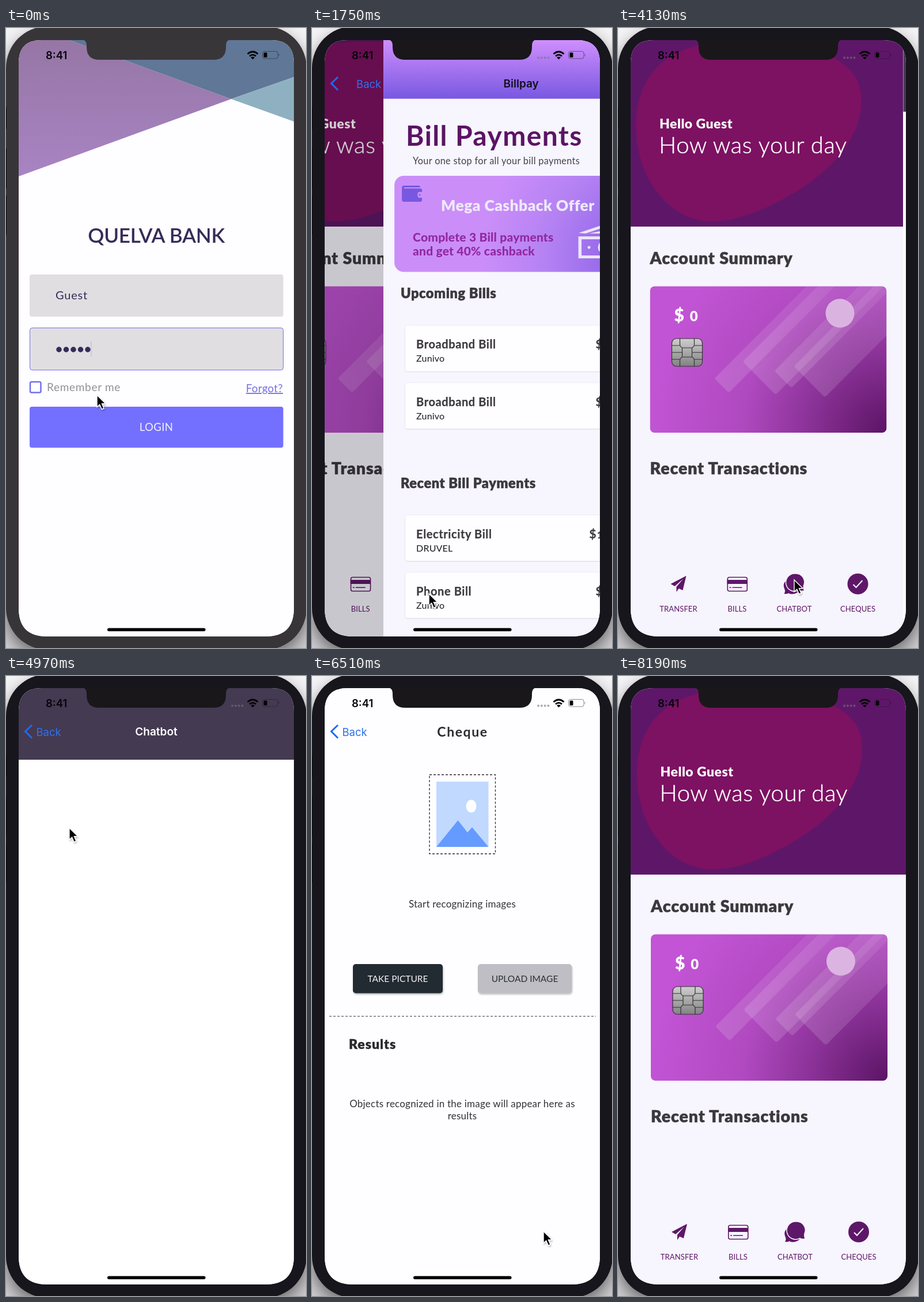
These frames come from a looping animation (521x1074 px, 8.26 s). An HTML page:

```html
<!DOCTYPE html>
<html lang="en">
<head>
<meta charset="utf-8">
<title>Banking app tour</title>
<style>
html, body { margin: 0; width: 100%; height: 100%; overflow: hidden; background: #dcdadd; }
svg { display: block; width: 100vw; height: 100vh; }
text { font-family: Lato, "Open Sans", sans-serif; white-space: pre; }
.ui { font-family: Inter, Roboto, sans-serif; }
.mid { text-anchor: middle; }
.end { text-anchor: end; }
.head, .sub { font-weight: 900; fill: #3b393d; stroke: #3b393d; stroke-width: .5px; }
.head { font-size: 28.5px; letter-spacing: .9px; }
.sub { font-size: 23.5px; letter-spacing: .6px; }
.item { font-size: 20px; font-weight: 700; letter-spacing: .6px; fill: #3d3a40; stroke: #3d3a40; stroke-width: .25px; }
.price { font-size: 21px; letter-spacing: 1.2px; }
.payee { font-size: 16px; letter-spacing: .2px; fill: #1d1b1f; }
.small { font-size: .8em; }
.tab { font-size: 13px; letter-spacing: .1px; fill: #5e1768; text-anchor: middle; }
.offer { font-size: 21px; font-weight: 800; letter-spacing: .2px; fill: #9128a1; }
.body { font-size: 17px; letter-spacing: .22px; fill: #333236; text-anchor: middle; }
.btn { font-size: 15.5px; text-anchor: middle; }

/* One shared 8.26 s clock */
.run { animation: 8.26s cubic-bezier(.3,.7,.2,1) infinite; }
#body { animation-name: body; animation-timing-function: step-end; }
#login { animation-name: login; }
#home { animation-name: home; }
#dim { animation-name: dim; }
#bills { animation-name: bills; }
#chat { animation-name: chat; }
#cheque { animation-name: cheque; }
#nav { animation-name: nav; animation-timing-function: linear; }
#back { animation-name: back; }
#cursor { animation-name: cursor; animation-timing-function: ease-in-out; }

@keyframes body { 0% { fill: #393639 } 4.24%, 100% { fill: #19171a } }
@keyframes login {
  0%, 6.8% { transform: none }
  12.8%, 100% { transform: translateX(-158px) }
}
@keyframes home {
  0%, 6.8% { transform: translateX(478px) }
  12.8%, 19.4% { transform: none }
  24.85%, 36.44% { transform: translateX(-158px) }
  41.9%, 49.99% { transform: none }
  55.4%, 63.56% { transform: translateX(-158px) }
  69%, 72.64% { transform: none }
  78.1%, 90.8% { transform: translateX(-158px) }
  96.25%, 100% { transform: none }
}
@keyframes dim {
  0%, 19.4% { opacity: 0 }
  24.85%, 36.44% { opacity: .24 }
  41.9%, 49.99% { opacity: 0 }
  55.4%, 63.56% { opacity: .24 }
  69%, 72.64% { opacity: 0 }
  78.1%, 90.8% { opacity: .24 }
  96.25%, 100% { opacity: 0 }
}
@keyframes bills {
  0%, 19.4% { transform: translateX(478px) }
  24.85%, 36.44% { transform: none }
  41.9%, 100% { transform: translateX(478px) }
}
@keyframes chat {
  0%, 49.99% { transform: translateX(478px) }
  55.4%, 63.56% { transform: none }
  69%, 100% { transform: translateX(478px) }
}
@keyframes cheque {
  0%, 72.64% { transform: translateX(478px) }
  78.1%, 90.8% { transform: none }
  96.25%, 100% { transform: translateX(478px) }
}
@keyframes nav {
  0%, 19.4% { opacity: 0 }
  21.1%, 36.44% { opacity: 1 }
  38.5%, 50.4% { opacity: 0 }
  52.2%, 63.56% { opacity: 1 }
  65.6%, 73% { opacity: 0 }
  74.8%, 90.8% { opacity: 1 }
  92.8%, 100% { opacity: 0 }
}
@keyframes back {
  0%, 19.4% { transform: translateX(115px); opacity: 1 }
  24.85%, 34.8% { transform: none; opacity: 1 }
  35.4%, 36.44% { transform: none; opacity: .2 }
  41.9%, 49.99% { transform: translateX(115px); opacity: 1 }
  55.4%, 62.4% { transform: none; opacity: 1 }
  62.9%, 63.56% { transform: none; opacity: .2 }
  69%, 72.64% { transform: translateX(115px); opacity: 1 }
  78.1%, 89.9% { transform: none; opacity: 1 }
  90.4%, 90.8% { transform: none; opacity: .2 }
  96.25%, 100% { transform: translateX(115px); opacity: 1 }
}
@keyframes cursor {
  0% { transform: translate(158px,636px) }
  3.63%, 10.9% { transform: translate(232px,690px) }
  16.34%, 26% { transform: translate(203px,980px) }
  34.5%, 37.05% { transform: translate(88px,94px) }
  46%, 56.3% { transform: translate(306px,956px) }
  61.9%, 64.2% { transform: translate(62px,94px) }
  70.1%, 81% { transform: translate(402px,962px) }
  89.6%, 94.4% { transform: translate(61px,93px); opacity: 1 }
  94.41%, 100% { transform: translate(61px,93px); opacity: 0 }
}
</style>
</head>
<body>
<svg viewBox="0 0 521 1074" preserveAspectRatio="none">
<defs>
  <clipPath id="screen"><path d="M62 21H460C487 21 500 34 500 61V1004C500 1038 484 1054 450 1054H72C38 1054 22 1038 22 1004V61C22 34 35 21 62 21Z"/></clipPath>
  <clipPath id="cardClip"><rect x="57" y="447.500" width="411" height="253.500" rx="8"/></clipPath>
  <linearGradient id="wall" x2="0" y2="1"><stop stop-color="#f4f3f5"/><stop offset="1" stop-color="#d2d0d4"/></linearGradient>
  <linearGradient id="violet" x2="0" y2="1"><stop stop-color="#9676a5"/><stop offset="1" stop-color="#a884c3"/></linearGradient>
  <linearGradient id="bar" x2="0" y2="1"><stop stop-color="#cf8efd"/><stop offset="1" stop-color="#7858e1"/></linearGradient>
  <linearGradient id="steel" x2="0" y2="1"><stop stop-color="#cfcfcf"/><stop offset="1" stop-color="#838383"/></linearGradient>
  <linearGradient id="beam"><stop stop-color="#fff" stop-opacity=".14"/><stop offset=".7" stop-color="#fff" stop-opacity=".06"/></linearGradient>
  <radialGradient id="offerFill" gradientUnits="userSpaceOnUse" cx="482" cy="400" r="290">
    <stop stop-color="#7556df"/><stop offset=".3" stop-color="#9a6deb"/><stop offset=".62" stop-color="#b582f3"/><stop offset="1" stop-color="#cb8ef9"/>
  </radialGradient>
  <radialGradient id="cardFill" gradientUnits="userSpaceOnUse" cx="468" cy="701" r="410">
    <stop stop-color="#5b1464"/><stop offset=".32" stop-color="#8a3197"/><stop offset=".62" stop-color="#b14ac1"/><stop offset="1" stop-color="#c254d5"/>
  </radialGradient>
  <filter id="soft" x="-10%" y="-30%" width="120%" height="170%"><feDropShadow dx="1" dy="2" stdDeviation="1.5" flood-opacity=".28"/></filter>
  <filter id="faint" x="-5%" y="-10%" width="110%" height="125%"><feDropShadow dx="0" dy=".6" stdDeviation=".8" flood-opacity=".16"/></filter>
  <filter id="deep"><feDropShadow dx="0" dy="12" stdDeviation="14" flood-opacity=".5"/></filter>
</defs>

<rect width="521" height="1074" fill="url(#wall)"/>
<rect id="body" class="run" x="0" y="-3" width="522" height="1080" rx="72" fill="#19171a" filter="url(#deep)"/>
<path d="M.5 137v38M.5 209v69M.5 290v68" stroke="#050505"/>

<g clip-path="url(#screen)">
  <rect x="22" y="21" width="478" height="1033" fill="#fff"/>

  <g id="login" class="run">
    <rect x="22" y="21" width="478" height="1033" fill="#fefdff"/>
    <path d="M22 21H110L391 123 22 257Z" fill="url(#violet)"/>
    <path d="M110 21H500V85L391 123Z" fill="#607797"/>
    <path d="M391 123 500 85V162Z" fill="#8fb0c1"/>
    <text class="mid" x="261" y="372" font-size="35" font-weight="600" letter-spacing="-.2" fill="#352c58">QUELVA BANK</text>
    <rect x="41" y="427" width="440.500" height="73" rx="4" fill="#e0dee1"/>
    <text x="86" y="470" font-size="20" letter-spacing=".8" fill="#342c58">Guest</text>
    <rect x="41.500" y="519.500" width="440" height="73" rx="4" fill="#e0dee1" stroke="#7772ea"/>
    <path d="M92 557h50.100" stroke="#352c58" stroke-width="9.500" stroke-linecap="round" stroke-dasharray="0 12.500"/>
    <path d="M148 543v26" stroke="#c3c1df" stroke-width="1.500"/>
    <rect x="42" y="613" width="18.500" height="18.500" rx="2.500" fill="#fff" stroke="#736ff0" stroke-width="2.500"/>
    <text x="71" y="629" font-size="19" letter-spacing=".7" fill="#929095">Remember me</text>
    <text class="end" x="481" y="631" font-size="18.500" letter-spacing=".4" fill="#7771df" text-decoration="underline">Forgot?</text>
    <rect x="41" y="656" width="440.500" height="71" rx="4" fill="#7470ff"/>
    <text class="mid" x="261" y="698" font-size="18.500" letter-spacing=".4" fill="#f2f1ff">LOGIN</text>
  </g>

  <g id="home" class="run">
    <rect x="22" y="21" width="478" height="1033" fill="#f7f5fe"/>
    <rect x="22" y="21" width="478" height="323" fill="#5e1768"/>
    <path d="M33 170C33 90 78 30 180 25C300 18 420 40 424 118C428 190 370 250 300 290C250 318 205 335 165 335C90 335 33 260 33 170Z" fill="#7d1162"/>
    <text x="73.500" y="174" font-size="23" font-weight="900" letter-spacing=".5" fill="#fff">Hello Guest</text>
    <text x="72.500" y="217" font-size="40" font-weight="300" letter-spacing=".6" fill="#fff" stroke="#fff" stroke-width=".5">How was your day</text>
    <text class="head" x="57" y="409">Account Summary</text>
    <g clip-path="url(#cardClip)">
      <rect x="57" y="447" width="411" height="255" fill="url(#cardFill)"/>
      <g id="beams" fill="url(#beam)"></g>
    </g>
    <circle cx="387" cy="494" r="25" fill="#dcb4e2"/>
    <text x="99" y="508" font-size="30" font-weight="900" letter-spacing="1.5" fill="#fff">$ <tspan class="small">0</tspan></text>
    <g stroke="#333" stroke-width="1.200" fill="none">
      <rect x="95" y="538" width="53" height="48" rx="8" fill="url(#steel)"/>
      <path d="M109 538v10q0 4 4 6h17q4-2 4-6v-10M109 586v-10q0-4 4-6h17q4 2 4 6v10M95 550h15M95 562h18v8M113 562v-8M95 574h15M148 550h-14M148 562h-18v8M130 562v-8M148 574h-14"/>
    </g>
    <text class="head" x="57" y="773">Recent Transactions</text>
    <g fill="#5e1768">
      <path d="M120 949 93 963 100 967 115 954 103 968V977L107 971 114 974Z"/>
      <rect x="191.800" y="951.500" width="34" height="24" rx="3" fill="none" stroke="#5e1768" stroke-width="1.600"/>
      <path d="M191 956h35v7h-35zM195 968.500h3v1.500h-3zM200 968.500h17v1.500h-17z"/>
      <path d="M290 980Q293 976 290 970C287 960 294 956 300 956L317 973C313 981 302 982 298 979Q294 981 290 980Z"/>
      <path d="M310 945a15 15 0 0 1 14 21q-1 4 1 9-6 1-9-1a15.500 15.500 0 1 1-6-29Z" stroke="#f7f5fe" stroke-width="1.500"/>
      <circle cx="418" cy="963" r="18"/>
      <path d="M410 964l5 5 11-12" fill="none" stroke="#f7f5fe" stroke-width="2"/>
    </g>
    <text class="tab" x="106.500" y="1011">TRANSFER</text>
    <text class="tab" x="208.500" y="1011">BILLS</text>
    <text class="tab" x="307.500" y="1011">CHATBOT</text>
    <text class="tab" x="418" y="1011">CHEQUES</text>
    <rect id="dim" class="run" x="22" y="21" width="478" height="1033" opacity="0"/>
  </g>

  <g id="bills" class="run">
    <rect x="22" y="21" width="478" height="1033" fill="#f7f5fe"/>
    <rect x="22" y="21" width="478" height="101.500" fill="url(#bar)"/>
    <text class="ui mid" x="261" y="103" font-size="19" font-weight="600" fill="#141020">Billpay</text>
    <text x="61" y="204" font-size="48" font-weight="700" letter-spacing="1.4" fill="#5b1465">Bill Payments</text>
    <text x="73" y="236" font-size="16.300" letter-spacing=".32" fill="#454249">Your one stop for all your bill payments</text>
    <rect x="41" y="256" width="440.500" height="166.500" rx="16" fill="url(#offerFill)"/>
    <path d="M58 273H83Q86 273 86 276H58V278H86Q89 278 89 281V284H83Q79 289 83 294H89V298Q89 301 86 301H58Q54 301 54 297V277Q54 273 58 273Z" fill="#7858e0"/>
    <circle cx="85" cy="289" r="1.500" fill="#7858e0"/>
    <text x="122" y="317" font-size="26.500" font-weight="900" letter-spacing=".4" fill="#eee9fb">Mega Cashback Offer</text>
    <text class="offer" x="73" y="370">Complete 3 Bill payments</text>
    <text class="offer" x="73" y="394">and get 40% cashback</text>
    <g fill="#ebe5fa">
      <path d="M361 355 421 335 427 344 420 346 418 341 373 356ZM379 356 431 345 434 356H427L426 351 399 356Z"/>
      <path d="M360.500 361H444.500V399H360.500ZM366 366V394H439V366Z" fill-rule="evenodd"/>
      <ellipse cx="402.500" cy="380" rx="8" ry="9.500"/>
      <circle cx="379" cy="380" r="2.500"/><circle cx="426" cy="380" r="2.500"/>
    </g>
    <text class="sub" x="52" y="468">Upcoming Bills</text>
    <text class="sub" x="52" y="797">Recent Bill Payments</text>
    <g id="rows"></g>
  </g>

  <g id="chat" class="run">
    <rect x="22" y="21" width="478" height="1033" fill="#fff"/>
    <rect x="22" y="21" width="478" height="124" fill="#443a52"/>
    <text class="ui mid" x="261" y="103" font-size="19" font-weight="600" fill="#fff">Chatbot</text>
  </g>

  <g id="cheque" class="run">
    <rect x="22" y="21" width="478" height="1033" fill="#fefdff"/>
    <text class="mid" x="261.500" y="105" font-size="23" font-weight="700" letter-spacing="1.6" fill="#2b2a2e">Cheque</text>
    <rect x="204" y="171" width="114.500" height="137" fill="none" stroke="#2e2b3a" stroke-width="1.300" stroke-dasharray="4 3"/>
    <rect x="216" y="183" width="90.500" height="113" fill="#c1d9ff"/>
    <ellipse cx="276.500" cy="225.500" rx="9" ry="11" fill="#fff"/>
    <path d="M216 296 253.500 250 270 271 278 262 306.500 296Z" fill="#659bff"/>
    <text class="body" x="261" y="401">Start recognizing images</text>
    <rect x="71" y="499" width="156" height="50.500" rx="5" fill="#222a33" filter="url(#soft)"/>
    <rect x="288" y="499" width="163" height="50.500" rx="5" fill="#bfbec4" filter="url(#soft)"/>
    <text class="btn" x="149" y="530" fill="#f3f3f5">TAKE PICTURE</text>
    <text class="btn" x="369.500" y="530" fill="#2c3038">UPLOAD IMAGE</text>
    <path d="M30 589.500H493" stroke="#6d7180" stroke-width="1.300" stroke-dasharray="4 3"/>
    <text x="64" y="646" font-size="23" font-weight="900" letter-spacing="1" fill="#29282c" stroke="#29282c" stroke-width=".4">Results</text>
    <text class="body" x="261" y="747">Objects recognized in the image will appear here as</text>
    <text class="body" x="261" y="768">results</text>
  </g>

  <g id="nav" class="run" opacity="0">
    <path d="M45 85 33.500 96 45 107.500" fill="none" stroke="#1d6cf5" stroke-width="3"/>
    <text id="back" class="run ui" x="52.500" y="103.500" font-size="18.500" fill="#2c72ee">Back</text>
  </g>

  <text class="ui" x="69" y="54" font-size="18.500" font-weight="600" fill="#060507">8:41</text>
  <g fill="#050506">
    <path d="M393 51.500h18" stroke="#77747f" stroke-opacity=".6" stroke-width="4" stroke-linecap="round" stroke-dasharray="0 5.800"/>
    <path d="M419.500 45Q428.500 37 437.500 45M423 48.800Q428.500 44 434 48.800" fill="none" stroke="#050506" stroke-width="2.800"/>
    <path d="M425 51Q428.500 48.500 432 51L428.500 54.500Z"/>
    <rect x="445.500" y="40.500" width="26.500" height="12.500" rx="3.500" fill="none" stroke="#1b1820" stroke-opacity=".5"/>
    <rect x="447.500" y="42.500" width="6" height="8.500" rx="1.500"/>
    <path d="M473.500 44.500q2 2 0 4.500z" opacity=".5"/>
  </g>
  <rect x="176" y="1039.500" width="170.500" height="5.500" rx="2.750"/>
</g>

<path id="notch" d="M132 20Q140 21 140 30V33Q140 55 162 55H360Q382 55 382 33V30Q382 21 390 20Z" fill="#19171a"/>

<g id="cursor" class="run" filter="url(#soft)">
  <path d="M0 0V20.500L4.700 16.200 8.300 24.500 12 23 8.500 14.700H15Z" fill="#000" stroke="#fff" stroke-width="1.400"/>
</g>
</svg>
<script>
const $ = id => document.getElementById(id);

// The notch shares the bezel's colour change
$("notch").style.animation = "body 8.26s step-end infinite";

// Diagonal light bands: left corner x, y and thickness
$("beams").innerHTML = [[169, 607, 35], [218, 578, 81], [273, 594, 42], [307, 586, 76]]
  .map(([x, y, h]) => `<rect width="400" height="${h}" rx="4" transform="translate(${x} ${y}) rotate(-45)"/>`)
  .join("");

// Old-style figures: short 0 and 1, hanging 4
const hang = `<tspan dy="4">4</tspan><tspan dy="-4" class="small">00</tspan>`;
const price = { 400: "$" + hang, 1400: `$<tspan class="small">1</tspan>` + hang };

$("rows").innerHTML = [
  [515.5, "Broadband Bill", "Zunivo", 400],
  [615, "Broadband Bill", "Zunivo", 400],
  [844, "Electricity Bill", "DRUVEL", 1400],
  [943, "Phone Bill", "Zunivo", 400]
].map(([y, name, payee, sum]) => `
  <rect x="60" y="${y}" width="397" height="79" rx="4" fill="#fefdff" filter="url(#faint)"/>
  <text class="item" x="79" y="${y + 39.5}">${name}</text>
  <text class="item price end" x="439" y="${y + 39.5}">${price[sum]}</text>
  <text class="payee" x="79" y="${y + 62.5}">${payee}</text>`).join("");
</script>
</body>
</html>
```
